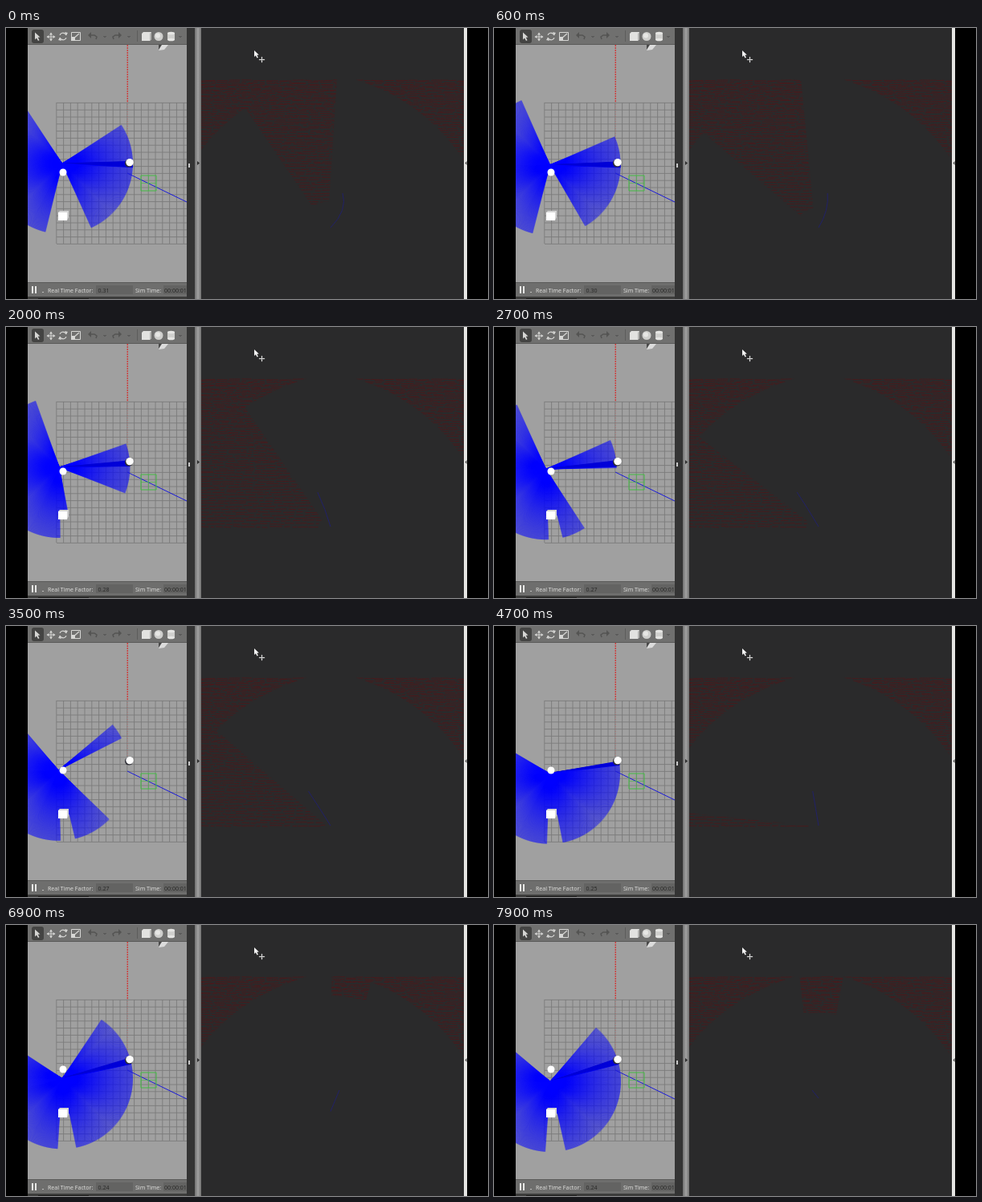
Recreate the animation shown at these times as an HTML page with a canvas. Size 600x338 px, loop 8 s.

```html
<!DOCTYPE html>
<html>
<head>
<meta charset="utf-8">
<style>
html, body { margin: 0; width: 100%; height: 100%; overflow: hidden; background: #000; }
canvas { display: block; }
</style>
</head>
<body>
<canvas id="stage" width="600" height="338"></canvas>
<script>
const ctx = document.getElementById('stage').getContext('2d');
const LOOP = 8000, STEP = 100, RANGE = 88;
const BALL = { x: 71, y: 180.6, r: 4 }, BOX = { x: 73, y: 236, r: 6 };
const rad = d => d * Math.PI / 180, deg = r => r * 180 / Math.PI;

// Direction of the scanner's blind quarter: [seconds, degrees]
const turns = [[0, -78], [1.2, -59], [2.7, -69], [3.5, -85], [4.7, -104], [5.9, -108], [7.9, -94.5]];

function turnAt(t) {
  const i = Math.max(1, turns.findIndex(k => k[0] >= t));
  const [t0, a] = turns[i - 1], [t1, b] = turns[i];
  return a + (b - a) * (t - t0) / (t1 - t0);
}

// Angles hidden behind an object, seen from the robot
function shadow(x, y, o) {
  const dx = o.x - x, dy = o.y - y, d = Math.hypot(dx, dy);
  const mid = deg(Math.atan2(dy, dx)), half = deg(Math.atan(o.r / d));
  return { d, lo: mid - half, hi: mid + half };
}

// The robot drives down the scene and swerves left around the ball
function robotAt(t) {
  const x = 70 - 5.5 * Math.exp(-(((t - 2.9) / 1.4) ** 2));
  const y = 169 + 2.9 * t + 0.05 * t * t;
  return { x, y, turn: turnAt(t), ball: shadow(x, y, BALL), box: shadow(x, y, BOX) };
}

function rect(c, x, y, w, h) { ctx.fillStyle = c; ctx.fillRect(x, y, w, h); }

function disc(c, x, y, r) {
  ctx.fillStyle = c;
  ctx.beginPath();
  ctx.arc(x, y, r, 0, 7);
  ctx.fill();
}

function trace(p) {
  ctx.beginPath();
  for (let i = 0; i < p.length; i += 2) ctx.lineTo(p[i], p[i + 1]);
}
function poly(c, ...p) { trace(p); ctx.fillStyle = c; ctx.fill(); }
function line(c, w, ...p) {
  trace(p);
  ctx.strokeStyle = c;
  ctx.lineWidth = w;
  ctx.stroke();
}

function clip(x, y, w, h, draw) {
  ctx.save();
  ctx.beginPath();
  ctx.rect(x, y, w, h);
  ctx.clip();
  draw();
  ctx.restore();
}

function text(s, x, y, c = '#dededc') {
  ctx.fillStyle = c;
  ctx.font = '7px "Noto Sans", sans-serif';
  ctx.fillText(s, x, y);
}

function pointer(c, x, y, s) {
  poly(c, x, y, x, y + 9 * s, x + 2 * s, y + 7 * s, x + 4 * s, y + 10.5 * s,
    x + 5.5 * s, y + 9.7 * s, x + 3.7 * s, y + 6.3 * s, x + 6.5 * s, y + 6 * s);
}

function moveCross(c, x, y, r, head) {
  for (let k = 0; k < 4; k++) {
    ctx.save();
    ctx.translate(x, y);
    ctx.rotate(k * Math.PI / 2);
    line(c, 1, 0, 0, 0, -r);
    poly(c, -head, head - r, head, head - r, 0, -r - 1);
    ctx.restore();
  }
}

function toolbar() {
  const icon = '#d6d6d4', faint = '#545453';
  rect('#70706f', 27, 0, 198, 20);
  rect('#5a5a59', 27, 20, 198, 1);
  ctx.fillStyle = '#444443';
  ctx.beginPath();
  ctx.roundRect(32, 2, 15, 17, 3);
  ctx.fill();
  pointer(icon, 36, 5.5, 1);
  moveCross(icon, 56, 11, 4.5, 2);

  ctx.strokeStyle = icon;
  ctx.lineWidth = 1.3;
  for (const a of [0.4, 3.54]) {
    ctx.beginPath();
    ctx.arc(71, 10.5, 4.3, a, a + 2.4);
    ctx.stroke();
  }
  poly(icon, 73, 5, 77, 6, 75, 9);
  poly(icon, 69, 16, 65, 15, 67, 12);

  line(icon, 1, 81.5, 5.5, 92.5, 5.5, 92.5, 15.5, 81.5, 15.5, 81.5, 5.5);
  line(icon, 1.2, 83, 14, 91, 7);
  rect(icon, 81, 11, 5, 5);
  for (const [x, s] of [[108, 1], [138, -1]]) {
    line(faint, 1.5, x - 4 * s, 9, x + 2 * s, 9, x + 5 * s, 11, x + 4 * s, 14);
    poly(faint, x - 6 * s, 9, x - 2 * s, 5, x - 2 * s, 13);
  }
  for (const x of [123, 153, 217]) line('#444', 1, x - 1.5, 10, x, 11.5, x + 1.5, 10);
  rect('#5c5c5b', 163, 3, 1, 14);
  poly('#e2e2e0', 169, 7, 171, 5, 181, 5, 181, 14, 179, 16, 169, 16);
  poly('#b4b4b2', 179, 7, 181, 5, 181, 14, 179, 16);
  disc('#cfcfcd', 190, 10.5, 5.5);
  disc('#e6e6e4', 189, 9.5, 3);
  rect('#cfcfcd', 201, 6, 9, 9);
  ctx.fillStyle = '#e6e6e4';
  ctx.beginPath();
  ctx.ellipse(205.5, 6.5, 4.5, 1.8, 0, 0, 7);
  ctx.ellipse(205.5, 14.5, 4.5, 1.8, 0, 0, 7);
  ctx.fill();
}

function statusBar(t) {
  const ink = '#2a2a29';
  rect('#6e6e6d', 27, 317, 198, 21);
  rect('#5a5a59', 27, 317, 198, 1);
  rect('#e8e8e6', 32, 322, 2, 9);
  rect('#e8e8e6', 36, 322, 2, 9);
  rect('#c0c0be', 45, 329, 2, 1);
  rect('#636362', 112, 321, 46, 11);
  rect('#636362', 196, 321, 29, 11);
  rect('#3c3c3b', 27, 335, 198, 3);
  rect('#1c1b1a', 40, 337, 63, 1);
  text('Real Time Factor:', 52, 329.5);
  text(Math.max(0.24, 0.3073 - 0.012 * t).toFixed(2), 114.5, 329.5, ink);
  text('Sim Time:', 161, 329.5);
  clip(196, 320, 29, 13, () => text('00:00:01', 197, 329.5, ink));
}

function within(a, lo, hi) { return ((a - lo) % 360 + 360) % 360 < hi - lo; }

// Thin overlapping rays: solid near the robot, fading outwards
function laser({ x, y, turn, ball, box }) {
  const aim = deg(Math.atan2(168 - y, 153 - x));
  ctx.lineWidth = 0.4;
  for (let a = turn + 45; a < turn + 315; a += 0.36) {
    const hitsBall = within(a, ball.lo, ball.hi), hitsBox = within(a, box.lo, box.hi);
    const r = hitsBall ? ball.d : hitsBox ? box.d : RANGE;
    const dark = r === RANGE && within(a, aim - 1, aim + 4);
    ctx.strokeStyle = dark ? '#0000d8' : '#00f';
    ctx.lineWidth = dark ? 1.2 : 0.4;
    ctx.beginPath();
    ctx.moveTo(x, y);
    ctx.lineTo(x + r * Math.cos(rad(a)), y + r * Math.sin(rad(a)));
    ctx.stroke();
  }
}

function world(robot) {
  rect('#a0a0a0', 27, 21, 198, 296);
  for (let i = 0; i <= 20; i++) {
    const p = i * 8.8;
    line('#7b7b7b', 0.9, 62.8 + p, 93, 62.8 + p, 269);
    line('#7b7b7b', 0.9, 63, 93.4 + p, 225, 93.4 + p);
  }
  poly('#dcdcdc', 193, 21, 202, 21, 197, 27, 190, 28);
  poly('#4a4a4a', 190, 21, 194, 21, 190, 27);
  ctx.setLineDash([2, 1]);
  line('#e01414', 1, 151.2, 21, 151.2, 92);
  ctx.setLineDash([1, 2]);
  line('rgba(200,90,90,.6)', 1, 151.2, 92, 151.2, 166);
  ctx.setLineDash([]);
  laser(robot);
  line('#1a1ad8', 1, 151, 181, 225, 217);
  line('#44bb44', 1, 168, 184, 187, 184, 187, 203, 168, 203, 168, 184);
  line('#44bb44', 0.6, 168, 193.5, 187, 193.5);
  line('#44bb44', 0.6, 177.5, 184, 177.5, 203);
  disc('#303038', 153, 168.6, 5);
  disc('#fff', 154, 167.6, 4.7);
  disc('#fff', 71, 180, 4.5);
  poly('#d4d4d4', 65, 230, 67, 228, 78, 228, 78, 236, 76, 240, 65, 240);
  rect('#fff', 65, 230, 11, 10);
}

// Broken, slightly uneven rows of points
function rows() {
  let seed = 7;
  const rnd = () => (seed = seed * 16807 % 2147483647) / 2147483647;
  ctx.strokeStyle = '#4a1a1c';
  ctx.lineWidth = 0.9;
  ctx.beginPath();
  for (let y = 65.5, gap = 2.2; y < 253; y += gap, gap += 0.025) {
    for (let x = 243; x < 570;) {
      const w = 4 + rnd() * 12, dy = (rnd() - 0.5) * 1.6;
      ctx.moveTo(x, y + dy);
      ctx.lineTo(x + w, y + dy + rnd() - 0.5);
      x += w + rnd() * 3;
    }
  }
  ctx.stroke();
}

// Hidden areas in the robot's own view, which turns with it
function addWedge({ lo, hi }, turn, near) {
  const a = rad(lo - turn - 268), b = rad(hi - turn - 268);
  ctx.moveTo(400 + near * Math.cos(a), 250 + near * Math.sin(a));
  ctx.arc(400, 250, 400, a, b);
  ctx.arc(400, 250, near, b, a, true);
  ctx.closePath();
}

function cloud(t, { turn, ball, box }) {
  rect('#2a2a2b', 243, 0, 327, 338);
  clip(243, 64, 327, 187, () => {
    ctx.beginPath();
    ctx.moveTo(243, 64);
    ctx.lineTo(375, 64);
    ctx.quadraticCurveTo(290, 90, 243, 152);
    ctx.closePath();
    ctx.moveTo(570, 64);
    ctx.lineTo(570, 165);
    ctx.quadraticCurveTo(520, 90, 434, 64);
    ctx.closePath();
    addWedge(ball, turn, Math.max(0, 5 * (ball.d - 5)));
    addWedge(box, turn, 6 * box.d - 106);
    ctx.clip();
    rows();
  });

  // Swaying trail that shortens near the end
  const x = 397 + 22 * Math.cos(t), end = 249 - 16.5 * Math.max(0, t - 5.9);
  ctx.strokeStyle = '#212168';
  ctx.lineWidth = 1;
  ctx.beginPath();
  ctx.moveTo(x, 206);
  ctx.quadraticCurveTo((x + 404) / 2 + 14 * Math.exp(-t), (206 + end) / 2, 404, end);
  ctx.stroke();
}

function divider() {
  rect('#343434', 225, 0, 11, 338);
  const shade = ctx.createLinearGradient(235, 0, 243, 0);
  shade.addColorStop(0, '#707070');
  shade.addColorStop(0.5, '#a2a2a2');
  shade.addColorStop(1, '#707070');
  rect(shade, 235, 0, 8, 338);
  rect('#c8c8c8', 227, 169, 2, 5);
  poly('#2a2a2a', 238, 166, 241, 168.5, 238, 171);
}

function frame(now) {
  const t = Math.floor(now % LOOP / STEP) * STEP / 1000;
  const robot = robotAt(t);
  rect('#000', 0, 0, 600, 338);
  clip(27, 20, 198, 298, () => world(robot));
  toolbar();
  statusBar(t);
  cloud(t, robot);
  divider();
  rect('#e6e6e4', 570, 0, 4, 338);
  poly('#444', 573.5, 166, 571.5, 168.5, 573.5, 171);
  pointer('#f4f4f4', 309, 28, 0.9);
  moveCross('#e0e0e0', 318.5, 39.5, 3, 1);
  requestAnimationFrame(frame);
}
requestAnimationFrame(frame);
</script>
</body>
</html>
```
